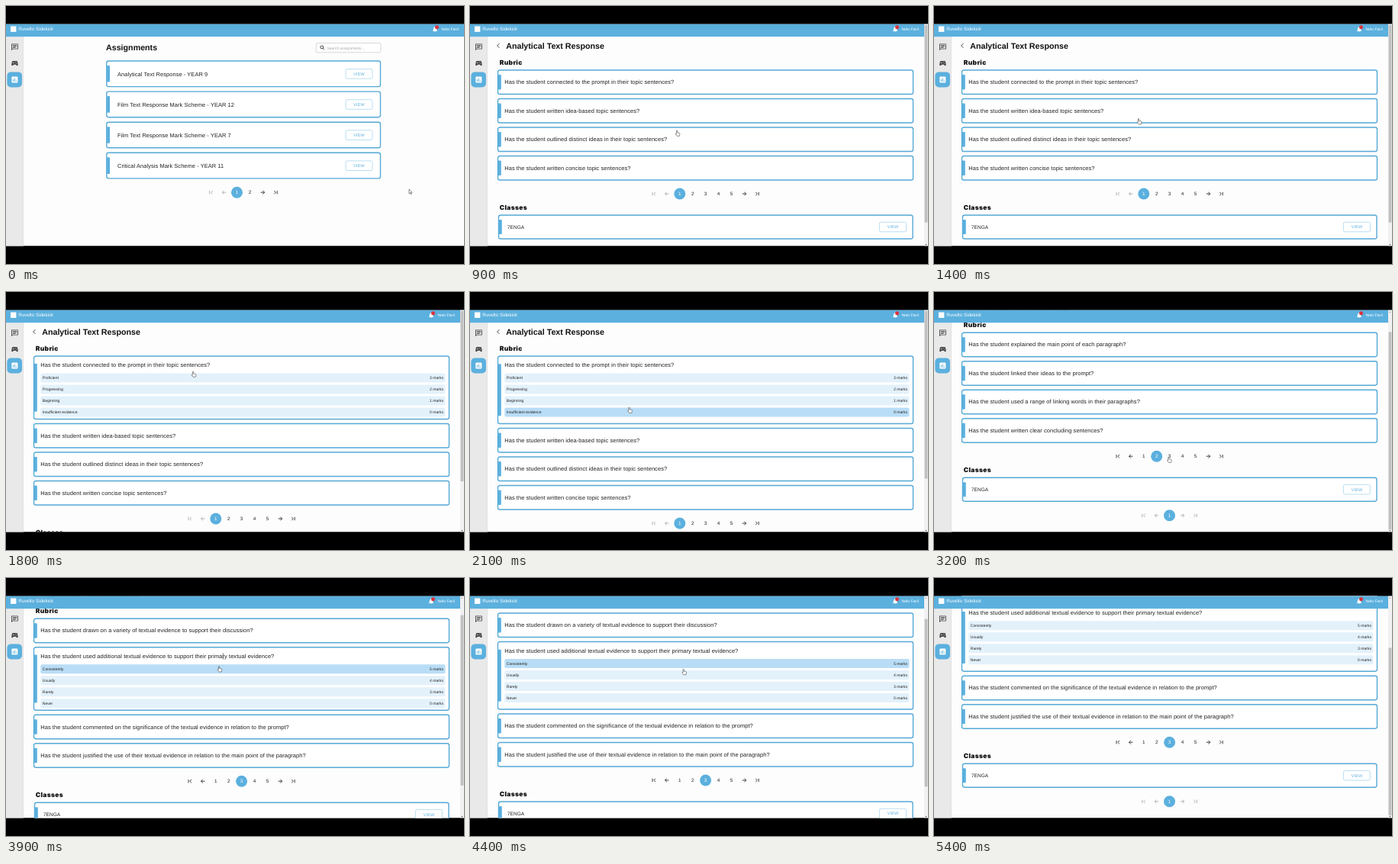
Recreate the animation shown at these times as an HTML page. Size 600 by 338 pixels, loop 5.5 s.

```html
<!DOCTYPE html>
<html lang="en">
<head>
<meta charset="utf-8">
<title>Assignments</title>
<style>
  html, body { margin: 0; width: 100%; height: 100%; overflow: hidden; background: #000; }
  svg { display: block; width: 600px; height: 338px; }
  text { font-family: "Liberation Sans", Arial, sans-serif; fill: #222; text-rendering: geometricPrecision; white-space: pre; }
  .body { letter-spacing: .00938em; }
  .title { font-weight: 700; fill: #111; }
  .heavy { font-family: Inter, sans-serif; font-weight: 900; letter-spacing: .3px; fill: #111; }
  .line { fill: none; stroke: #222; stroke-width: .85; }
  .off { stroke: #a8a8a8; }
</style>
</head>
<body>
<svg id="stage" viewBox="0 0 600 338">
  <clipPath id="window"><rect y="23.5" width="600" height="291"/></clipPath>
  <clipPath id="fold"><rect id="foldBox" x="30" width="560"/></clipPath>
</svg>
<script>
const BLUE = '#5bb0de', LOOP = 5500, STEP = 100;
const FULL = 57, BASE_SCROLL = 30.8;

const stage = document.getElementById('stage');
const foldBox = document.getElementById('foldBox');

function add(parent, tag, attrs = {}) {
  const node = document.createElementNS('http://www.w3.org/2000/svg', tag);
  set(node, attrs);
  parent.append(node);
  return node;
}
function set(node, attrs) {
  for (const k in attrs) node.setAttribute(k, attrs[k]);
}
const group = (parent, x = 0, y = 0) => add(parent, 'g', { transform: `translate(${x} ${y})` });
const rect = (parent, x, y, width, height, fill, rx = 0) =>
  add(parent, 'rect', { x, y, width, height, fill, rx });
const path = (parent, d, attrs) => add(parent, 'path', { d, ...attrs });
const show = (node, on) => set(node, { display: on ? 'inline' : 'none' });

// y is the middle of the capitals
function label(parent, x, y, size, str, attrs = {}) {
  const node = add(parent, 'text', { x, y: y + size * .36, 'font-size': size, ...attrs });
  node.textContent = str;
  return node;
}

function card(parent, x, y, w, h) {
  const box = rect(parent, x, y, w, h, '#fff', 2.6);
  set(box, { stroke: '#55a9d7', 'stroke-width': 1.4 });
  const tab = rect(parent, x + .3, y + 6, 4, h - 12, BLUE, 1);
  return { box, tab };
}

function viewButton(parent, x, y) {
  set(rect(parent, x, y, 35, 12.6, '#fff', 2), { stroke: '#a9d6ee', 'stroke-width': .8 });
  label(parent, x + 17.6, y + 6.3, 5.5, 'VIEW',
    { 'text-anchor': 'middle', 'letter-spacing': .15, style: `fill:${BLUE}` });
}

function pager(parent, x, y, pages) {
  const gap = 16.9, g = group(parent, x, y);
  const dot = add(g, 'circle', { r: 7.5, fill: BLUE });
  const icon = (i, d) => path(g, d, { class: 'line', transform: `translate(${i * gap} 0)` });
  const back = [icon(0, 'M-2-2.2V2.2M2-2.2-.2 0 2 2.2'), icon(1, 'M2.6 0H-2.4M0-2.4-2.4 0 0 2.4')];
  const next = [icon(pages + 2, 'M-2.6 0H2.4M0-2.4 2.4 0 0 2.4'), icon(pages + 3, 'M2-2.2V2.2M-2-2.2 .2 0-2 2.2')];
  const nums = Array.from({ length: pages }, (_, i) =>
    label(g, (i + 2) * gap, 0, 6.3, i + 1, { 'text-anchor': 'middle' }));
  const go = page => {
    set(dot, { cx: (page + 1) * gap });
    nums.forEach((n, i) => n.style.fill = i + 1 === page ? '#fff' : '#222');
    back.forEach(n => n.classList.toggle('off', page === 1));
    next.forEach(n => n.classList.toggle('off', page === pages));
  };
  go(1);
  return go;
}

const screen = add(stage, 'g', { 'clip-path': 'url(#window)' });
rect(screen, 0, 23.5, 600, 291, '#fdfdfd');

// Assignment list
const list = group(screen);
label(list, 131, 54.6, 10.7, 'Assignments', { class: 'title' });
set(rect(list, 406.3, 48.6, 84.6, 12.2, '#fff', 1.5), { stroke: '#c8c8c8', 'stroke-width': .7 });
path(list, 'M415.2 55.4 417 57.2M415.7 54a1.9 1.9 0 1 1-3.8 0 1.9 1.9 0 1 1 3.8 0', { class: 'line' });
label(list, 420.5, 54.8, 4.95, 'Search assignments...', { style: 'fill:#a5a5a5' });
['Analytical Text Response - YEAR 9', 'Film Text Response Mark Scheme - YEAR 12',
 'Film Text Response Mark Scheme - YEAR 7', 'Critical Analysis Mark Scheme - YEAR 11'].forEach((name, i) => {
  const y = 72 + i * 40.1;
  card(list, 131.8, y, 358.7, 33.6);
  label(list, 146, y + 16.9, 7.45, name, { class: 'body' });
  viewButton(list, 445, y + 10.6);
});
pager(list, 268.7, 244.2, 2);

// Rubric detail
const QUESTIONS = [
  ['connected to the prompt in their topic sentences?', 'written idea-based topic sentences?',
   'outlined distinct ideas in their topic sentences?', 'written concise topic sentences?'],
  ['explained the main point of each paragraph?', 'linked their ideas to the prompt?',
   'used a range of linking words in their paragraphs?', 'written clear concluding sentences?'],
  ['drawn on a variety of textual evidence to support their discussion?',
   'used additional textual evidence to support their primary textual evidence?',
   'commented on the significance of the textual evidence in relation to the prompt?',
   'justified the use of their textual evidence in relation to the main point of the paragraph?']
];
const MARKS = [
  [['Proficient', 3], ['Progressing', 2], ['Beginning', 1], ['Insufficient evidence', 0]],
  [['Consistently', 5], ['Usually', 4], ['Rarely', 3], ['Never', 0]]
];

const detail = group(screen);
path(detail, 'M38.4 49.2 35.6 52 38.4 54.8', { class: 'line' });
label(detail, 47.2, 52, 10.7, 'Analytical Text Response', { class: 'title' });
label(detail, 38.8, 73.6, 8.5, 'Rubric', { class: 'heavy' });
const cards = [0, 1, 2, 3].map(() => {
  const g = group(detail);
  return { g, ...card(g, 36.5, 0, 544, 31.5), q: label(g, 45.2, 0, 7.47, '', { class: 'body' }) };
});
const answers = add(detail, 'g', { 'clip-path': 'url(#fold)' });
const rows = [0, 1, 2, 3].map(i => {
  const y = 28.6 + i * 15;
  return {
    bg: rect(answers, 45.3, y - 6, 530.2, 12, '#e3f1fb', 2),
    name: label(answers, 47.8, y, 5.06, ''),
    mark: label(answers, 573, y, 5.06, '', { 'text-anchor': 'end' })
  };
});
const caret = rect(answers, 283.9, 7.5, .6, 8.5, '#333');

const lower = group(detail);
const goPage = pager(lower, 241, 246, 5);
label(lower, 38.8, 264, 8.5, 'Classes', { class: 'heavy' });
card(lower, 37.5, 274, 542.5, 31);
label(lower, 49, 289.6, 6.5, '7ENGA');
viewButton(lower, 536.4, 283.2);
pager(lower, 274.7, 323.6, 1);

// Side bar and top bar
rect(screen, 0, 40, 22.5, 275, '#e9e9e9');
rect(screen, 22, 40, .6, 275, '#d6d6d6');
path(screen, 'M4 4h16v12H5.2L4 17.2ZM2 2V22l4-4h14q2 0 2-2V4q0-2-2-2ZM6 12h8v2H6zm0-3h12v2H6zm0-3h12v2H6z',
  { transform: 'translate(6.2 48.6) scale(.44)', fill: '#444', 'fill-rule': 'evenodd' });
path(screen, 'M7.5 5h9q3.5 0 4 3.4l1.1 7.7Q21.6 19 19 19q-1 0-1.8-.8L15 16H9l-2.3 2.2Q6 19 5 19q-2.6 0-2.6-2.9L3.5 8.4Q4 5 7.5 5ZM8 8v2H6v1h2v2h1v-2h2v-1H9V8zm6 0v2h2V8zm2 3v2h2v-2z',
  { transform: 'translate(6.2 69.8) scale(.44)', fill: '#444', 'fill-rule': 'evenodd' });
rect(screen, 1.4, 86.4, 19.6, 20, BLUE, 5);
rect(screen, 7.4, 92.6, 8, 8, '#fff', 1);
[[9.1, 95.8], [11, 94.4], [12.9, 97.6]].forEach(([x, y]) => rect(screen, x, y, .9, 99 - y, BLUE));

rect(screen, 0, 23.5, 600, 16.7, BLUE);
rect(screen, 6, 26.5, 7.4, 7.4, '#fff');
label(screen, 16.2, 30.2, 6.23, 'Ruvelto Sidekick', { style: 'fill:#fff' });
const user = group(screen);
path(user, 'M12 22q2 0 2-2h-4q0 2 2 2Zm6-6v-5q0-5-4.5-6.3V4q0-1.5-1.5-1.5T10.5 4v.7Q6 6 6 11v5l-2 2v1h16v-1Z',
  { transform: 'translate(557.6 25.9) scale(.37)', fill: '#fff' });
add(user, 'circle', { cx: 564.5, cy: 27.8, r: 2.5, fill: '#d9363e' });
label(user, 570.5, 30, 5.1, 'Nelo Fard', { style: 'fill:#fff' });

// Scroll bar
const bar = group(screen);
rect(bar, 595, 23.5, 5, 291, '#f1f1f1');
path(bar, 'M596.3 27 597.5 25.3 598.7 27Z', { fill: '#a0a0a0' });
path(bar, 'M596.3 312 597.5 313.6 598.7 312Z', { fill: '#505050' });
const thumb = rect(bar, 595.5, 25, 4, 260, '#c1c1c1');

// Pointer
const pointer = group(screen);
const ink = { fill: '#fff', stroke: '#333', 'stroke-width': .55, 'stroke-linejoin': 'round' };
const arrow = path(pointer, 'M0 0V5.8L1.4 4.6 2.4 6.8 3.3 6.4 2.3 4.3H4.2Z', ink);
const hand = path(pointer, 'M-.6.4Q0-.5.6.4V2.8L3.2 3.4Q4 3.7 3.9 4.6L3.3 7.4H.2L-1.9 4.8Q-1.7 3.8-.6 4.5Z', ink);

// [time, x, y]
const MOVES = [
  [0, 528, 240], [100, 526, 234], [200, 508, 190], [300, 478, 118], [400, 464, 92], [600, 462, 88],
  [700, 440, 100], [800, 340, 145], [900, 271, 163], [1300, 270, 161], [1400, 268, 147.5],
  [1500, 262, 115], [1600, 256, 101], [1800, 245, 104], [2000, 215, 138], [2100, 208.5, 151],
  [2200, 216, 166], [2400, 242, 195.5], [2600, 275, 211], [2700, 291, 216], [2900, 291, 216],
  [3100, 307, 216], [3400, 308, 216], [3500, 301, 185], [3600, 288, 130], [3700, 284, 101],
  [3800, 281, 108], [3900, 279, 115.5], [4200, 279, 118], [4800, 281, 122], [4900, 270, 120],
  [5100, 120, 70], [5300, 2, 26]
];
// [time, offset]
const SCROLL = [
  [2100, 0], [2200, 7], [2300, 31], [2400, 62.5], [2500, 83], [2600, 88], [2700, 88],
  [2800, BASE_SCROLL], [4300, BASE_SCROLL], [4400, 38], [4500, 62], [4600, 81], [4700, 88]
];
const ARROW_TIMES = [[0, 300], [700, 900], [2200, 2700], [4700, 5500]];

function track(table, t, col = 1) {
  const i = table.findIndex(k => k[0] > t);
  if (i < 0) return table[table.length - 1][col];
  if (i === 0) return table[0][col];
  const a = table[i - 1], b = table[i];
  return a[col] + (b[col] - a[col]) * (t - a[0]) / (b[0] - a[0]);
}
const clamp = v => Math.min(1, Math.max(0, v));
const unfold = (t, start) => 1 - (1 - clamp((t - start) / 300)) ** 2.05;

function drawDetail(t, tipY) {
  const page = t < 2800 ? 1 : t < 3300 ? 2 : 3;
  const open = page === 3 ? 1 : 0;
  const p = page === 2 ? 0 : unfold(t, page === 1 ? 1600 : 3700);
  const grow = FULL * p;
  const range = BASE_SCROLL + grow;
  const scroll = Math.min(track(SCROLL, t), range);
  const topOf = i => 84 + 37.5 * i + (i > open ? grow : 0);

  set(detail, { transform: `translate(0 ${-scroll})` });
  cards.forEach((c, i) => {
    const k = i === open ? p : 0;
    const h = 31.5 + FULL * k, inset = 6 + 4.2 * k;
    set(c.g, { transform: `translate(0 ${topOf(i)})` });
    set(c.box, { height: h });
    set(c.tab, { y: inset, height: h - 2 * inset });
    set(c.q, { y: 18.3 - 4 * clamp(k * 1.3) });
    c.q.textContent = 'Has the student ' + QUESTIONS[page - 1][i];
  });

  const top = topOf(open);
  const over = Math.floor((tipY + scroll - top - 22) / 15);
  set(answers, { transform: `translate(0 ${top})` });
  set(foldBox, { height: 30.5 + grow });
  show(answers, p > 0);
  rows.forEach((r, i) => {
    const [name, mark] = MARKS[page === 3 ? 1 : 0][i];
    r.name.textContent = name;
    r.mark.textContent = mark + ' marks';
    set(r.bg, { fill: i === over ? '#b9ddf6' : '#e3f1fb' });
  });
  show(caret, t >= 3800 && t < 4000);

  set(lower, { transform: `translate(0 ${grow})` });
  goPage(page);
  const scale = 286 / (290 + range);
  set(thumb, { y: 25 + scroll * scale, height: 290 * scale });
}

function draw(t) {
  const inDetail = t >= 700;
  const x = track(MOVES, t, 1), y = track(MOVES, t, 2);
  show(list, !inDetail);
  show(detail, inDetail);
  show(bar, inDetail);
  set(user, { transform: `translate(${inDetail ? -5 : 0} 0)` });
  if (inDetail) drawDetail(t, y);

  const isArrow = ARROW_TIMES.some(([a, b]) => t >= a && t < b);
  set(pointer, { transform: `translate(${x} ${y})` });
  show(pointer, t < 5300);
  show(arrow, isArrow);
  show(hand, !isArrow);
}

const start = performance.now();
function tick() {
  const t = (performance.now() - start) % LOOP;
  draw(Math.floor(t / STEP) * STEP);
  requestAnimationFrame(tick);
}
tick();
</script>
</body>
</html>
```
